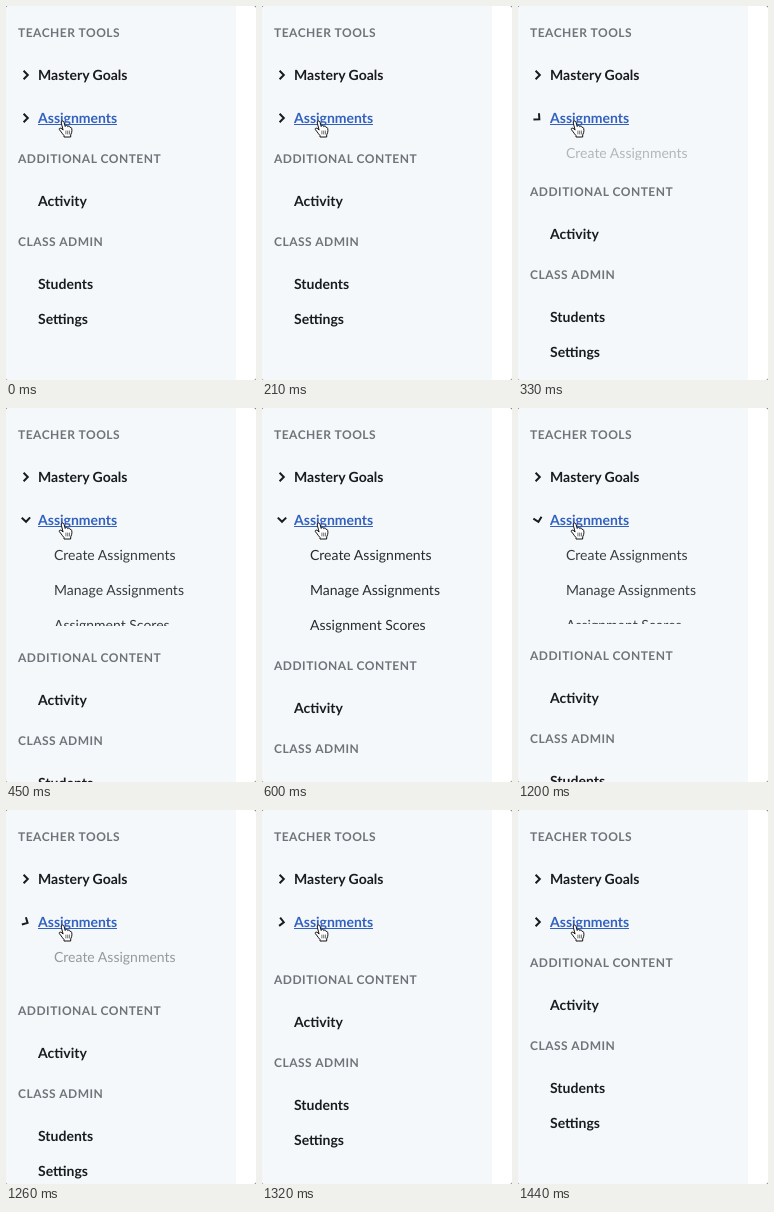
Write an HTML page that moves like this. It is 250x374 px and loops after 1740 ms.

```html
<!DOCTYPE html>
<html lang="en">
<head>
<meta charset="utf-8">
<title>Class menu</title>
<style>
  html, body { margin: 0; width: 100%; height: 100%; overflow: hidden; background: #777; }
  svg { display: block; width: 250px; height: 374px; }
  text { font: 700 14px Lato, sans-serif; fill: #191b1f; text-rendering: geometricPrecision; }
  .head { font-size: 12px; letter-spacing: .5px; fill: #707378; }
  .sub text { font-weight: 400; fill: #282a2e; }
  .link { fill: #3261c0; }
  .chevron { fill: none; stroke: #191b1f; stroke-width: 2; }
</style>
</head>
<body>
<svg viewBox="0 0 250 374">
  <defs>
    <clipPath id="clip"><rect id="window" x="0" y="121" width="230" height="0"/></clipPath>
  </defs>
  <rect width="250" height="374" rx="2.5" fill="#fff"/>
  <path d="M230 0H2.5Q0 0 0 2.5V371.5Q0 374 2.5 374H230Z" fill="#f5f8fb"/>

  <text class="head" x="12" y="31">TEACHER TOOLS</text>
  <path class="chevron" d="M17.6 64.8L21.8 69L17.6 73.2"/>
  <text x="32" y="74">Mastery Goals</text>
  <path class="chevron" id="arrow" d="M17.6 107.8L21.8 112L17.6 116.2"/>
  <text class="link" x="32" y="117">Assignments</text>
  <rect class="link" x="32" y="118" width="79" height="1"/>

  <g clip-path="url(#clip)">
    <g class="sub" id="sub">
      <text x="48" y="152">Create Assignments</text>
      <text x="48" y="187">Manage Assignments</text>
      <text x="48" y="222">Assignment Scores</text>
    </g>
  </g>

  <g id="lower">
    <text class="head" x="12" y="157">ADDITIONAL CONTENT</text>
    <text x="32" y="200">Activity</text>
    <text class="head" x="12" y="240">CLASS ADMIN</text>
    <text x="32" y="283">Students</text>
    <text x="32" y="318">Settings</text>
  </g>

  <!-- hand pointer -->
  <g transform="translate(-.6 -.5)" stroke="#111" stroke-linejoin="round" stroke-linecap="round">
    <path fill="#fff" d="M57.6 124.2L55.9 117.6Q55.5 115.8 56.9 115.5Q58.2 115.3 58.7 117L59.8 121
      Q60 119.6 61.2 119.8Q62.2 120 62.4 121.2Q62.9 120.3 63.9 120.7Q64.7 121 64.8 122
      Q65.9 121.6 66.3 123Q66.8 125.2 66.2 127.2L65.3 129.4V131.5H58.6V130
      Q57 128.3 55.8 126.4L54 124.2Q53.4 123.2 54.4 122.7Q55.4 122.4 56.3 123.2Z"/>
    <path fill="none" stroke-width=".6" d="M60.5 125.5V128.5M62.3 125.5V128.5M64 125.5V128.5"/>
  </g>
</svg>
<script>
  const LOOP = 1740, STEP = 30, OPEN = 243, CLOSE = 1146, FULL = 105;
  const el = id => document.getElementById(id);
  const clamp = v => Math.min(1, Math.max(0, v));

  // cubic-bezier(.4, 0, .2, 1), solved by bisection
  function ease(x) {
    let lo = 0, hi = 1;
    for (let i = 0; i < 24; i++) {
      const s = (lo + hi) / 2, r = 1 - s;
      if (1.2 * r * r * s + 0.6 * r * s * s + s ** 3 < x) lo = s; else hi = s;
    }
    return lo * lo * (3 - 2 * lo);
  }

  // 0 when closed, 1 when open
  const openness = (t, span) =>
    ease(clamp((t - OPEN) / span)) - ease(clamp((t - CLOSE) / span));

  function draw(now) {
    const t = Math.floor(now % LOOP / STEP) * STEP;
    const p = openness(t, 310);
    const height = Math.round(FULL * p);
    el("window").setAttribute("height", height);
    el("sub").setAttribute("opacity", p);
    el("lower").setAttribute("transform", `translate(0 ${height})`);
    el("arrow").setAttribute("transform", `rotate(${90 * openness(t, 260)} 20 112)`);
  }

  const start = performance.now();
  function tick() {
    draw(performance.now() - start);
    requestAnimationFrame(tick);
  }
  tick();
</script>
</body>
</html>
```
